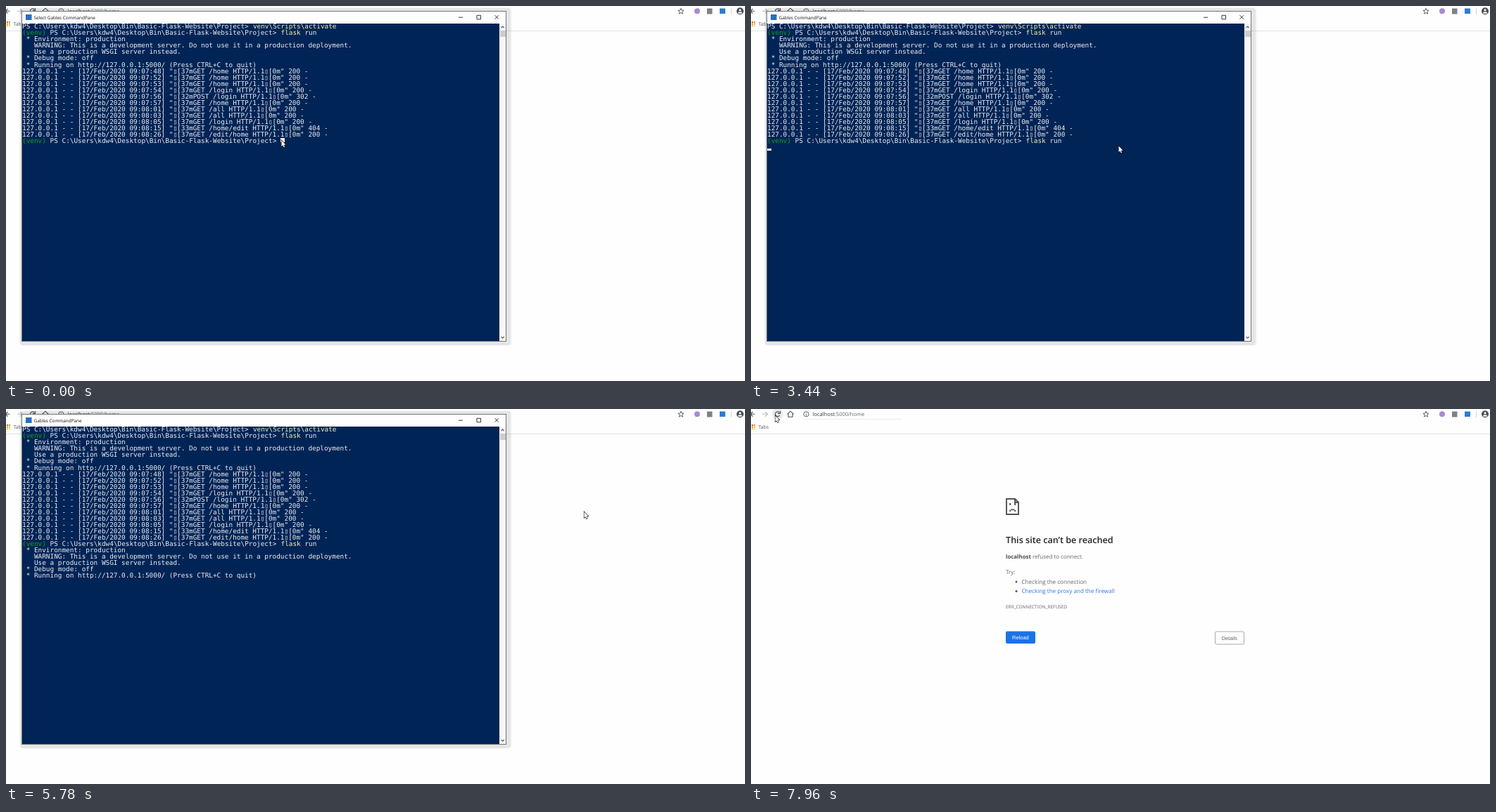
An HTML page with a canvas that plays this animation: 1050 px wide and 534 px high, repeating every 8 s.

```html
<!DOCTYPE html>
<html lang="en">
<head>
<meta charset="utf-8">
<title>Restarting a server</title>
<style>
html, body { margin: 0; width: 100%; height: 100%; overflow: hidden; background: #fefefe; }
canvas { display: block; }
</style>
</head>
<body>
<canvas id="stage" width="1050" height="534"></canvas>
<script>
const ctx = document.getElementById('stage').getContext('2d');
const SANS = '"Open Sans", "Noto Sans", sans-serif';
const ARIAL = '"Liberation Sans", Arial, sans-serif';
const MONO = '9.39px "DejaVu Sans Mono", monospace';
const CELL = 5.654, ROW = 9.05, LEFT = 23, TOP = 25;
const NAVY = '#012456', PALE = '#eeedf0', CREAM = '#feedd8', GREEN = '#16a01a', YELLOW = '#f3efb0';
const INK = '#4d5155', GRAY = '#646464';

// Key moments of the story, in ms.
const LOOP = 8000, DESELECT = 1490, TYPING = 2360, ENTER = 3440, SERVING = 4830, MINIMIZE = 5930;
const KEY_STEP = 120, MOVE_STEP = 140, BLINK = 510;

const COMMAND = 'flask run';
const VENV = '(venv) ';
const PATH = 'PS C:\\Users\\kdw4\\Desktop\\Bin\\Basic-Flask-Website\\Project> ';
const PROMPT_COL = VENV.length + PATH.length;
const BANNER = [
  ' * Environment: production',
  '   WARNING: This is a development server. Do not use it in a production deployment.',
  '   Use a production WSGI server instead.',
  ' * Debug mode: off',
  ' * Running on http://127.0.0.1:5000/ (Press CTRL+C to quit)'
];
const REQUESTS = [
  '07:48] "▯[37mGET /home 200', '07:52] "▯[37mGET /home 200', '07:53] "▯[37mGET /home 200',
  '07:54] "▯[37mGET /login 200', '07:56] "▯[32mPOST /login 302', '07:57] "▯[37mGET /home 200',
  '08:01] "▯[37mGET /all 200', '08:03] "▯[37mGET /all 200', '08:05] "▯[37mGET /login 200',
  '08:15] "▯[33mGET /home/edit 404', '08:26] "▯[37mGET /edit/home 200'
].map(entry => '127.0.0.1 - - [17/Feb/2020 09:' + entry.replace(/ (\d+)$/, ' HTTP/1.1▯[0m" $1 -'));
const PROMPT_ROW = 2 + BANNER.length + REQUESTS.length;

// Pointer moves: each reaches its goal in equal steps.
const MOVES = [
  { at: 750, steps: 2, x: 522, y: 199 },
  { at: SERVING, steps: 1, x: 713, y: 177, shape: 'resize' },
  { at: 4990, steps: 1, x: 832, y: 177 },
  { at: 5260, steps: 1, x: 819, y: 177 },
  { at: 5780, steps: 1, x: 821, y: 146 },
  { at: 6190, steps: 3, x: 497, y: 259, shape: 'hand' },
  { at: 6640, steps: 3, x: 287, y: 114 },
  { at: 7150, steps: 2, x: 21, y: 14 },
  { at: 7530, steps: 2, x: 34, y: 9 }
];

function pointerAt(t) {
  let pose = { x: 391, y: 191 };
  for (const move of MOVES.filter(m => m.at <= t)) {
    const p = Math.min(1, (Math.floor((t - move.at) / MOVE_STEP) + 1) / move.steps);
    pose = {
      x: pose.x + (move.x - pose.x) * p,
      y: pose.y + (move.y - pose.y) * p,
      shape: p === 1 ? move.shape : undefined
    };
  }
  return pose;
}

function typedCount(t) {
  const step = Math.floor((t - TYPING) / KEY_STEP);
  return Math.max(0, Math.min(COMMAND.length, Math.round(step * COMMAND.length / 7)));
}

function caretOn(t) {
  const typed = typedCount(t);
  if (typed && typed < COMMAND.length) return true;
  const restart = [-260, 1860, ENTER, SERVING + 140].findLast(s => s <= t);
  return Math.floor((t - restart) / BLINK) % 2 === 0;
}

function text(str, x, y, font, color) {
  ctx.font = font;
  ctx.fillStyle = color;
  ctx.fillText(str, x, y);
}

function rect(x, y, w, h, color) {
  ctx.fillStyle = color;
  ctx.fillRect(x, y, w, h);
}

function stroke(shape, color = INK, width = 1.1) {
  ctx.strokeStyle = color;
  ctx.lineWidth = width;
  ctx.stroke(new Path2D(shape));
}

function disc(x, y, r, color) {
  ctx.beginPath();
  ctx.arc(x, y, r, 0, 2 * Math.PI);
  ctx.fillStyle = color;
  ctx.fill();
}

function panel(x, y, w, h, r, fill, border) {
  ctx.beginPath();
  ctx.roundRect(x, y, w, h, r);
  ctx.fillStyle = fill;
  ctx.fill();
  if (!border) return;
  ctx.strokeStyle = border;
  ctx.lineWidth = 1;
  ctx.stroke();
}

function arrow(tip, tail, y, color) {
  const side = Math.sign(tail - tip) * 3.3;
  stroke(`M${tail} ${y}H${tip}m${side} -3.3l${-side} 3.3l${side} 3.3`, color);
}

function chevron(x, y, rise) {
  stroke(`M${x - 2} ${y + rise}l2 ${-rise}l2 ${rise}`, '#555');
}

function drawToolbar(t) {
  if (t >= 7960) disc(38, 7, 8, '#e9eaec');
  arrow(-0.8, 5.5, 7.3, INK);
  arrow(23.5, 16, 7.3, '#b4b7ba');
  stroke('M40.8 9A3.4 3.4 0 1 1 40.2 4.8M41.5 3V6.4H38', INK, 1.3);
  stroke('M51.5 7.5L56 3.2L60.5 7.5M53 7V11.3H59V7');
  stroke('M74.8 7.3a3.6 3.6 0 1 0 7.2 0a3.6 3.6 0 1 0 -7.2 0M78.4 5.2v1M78.4 6.9v2.5', INK, 0.9);

  const urlFont = '7.5px ' + SANS;
  text('localhost', 87.5, 10, urlFont, '#34373a');
  text(':5000/home', 87.5 + ctx.measureText('localhost').width, 10, urlFont, '#666a6e');
  if (t >= 7150) rect(75, 14, 140, 1, '#ececee');

  for (let i = 0; i < 9; i++) {
    const row = Math.floor(i / 3);
    rect(-2 + i % 3 * 3, 22 + row * 2.7, 2, 2, `hsl(${row * 18 + i % 3 * 12} 80% 55%)`);
  }
  text('Tabs', 10.5, 28, '6.8px ' + SANS, '#54585c');

  ctx.beginPath();
  for (let i = 0; i < 10; i++) {
    const r = i % 2 ? 1.9 : 4.3, a = i * Math.PI / 5 - Math.PI / 2;
    ctx.lineTo(959 + r * Math.cos(a), 7.6 + r * Math.sin(a));
  }
  ctx.closePath();
  ctx.strokeStyle = INK;
  ctx.lineWidth = 0.9;
  ctx.stroke();

  disc(982, 7.3, 4, '#a78bd0');
  rect(996, 3.5, 7.5, 8, '#808080');
  rect(1014, 3.5, 8, 7.5, '#2b7cd3');
  rect(1030, 3, 1, 9, '#d5d7da');
  disc(1043, 7.3, 5, '#494c50');
  disc(1043, 5.8, 1.6, '#fff');
  panel(1040.2, 8.6, 5.6, 2.2, 1.1, '#fff');
  rect(0, 35, 1050, 1, '#e2e3e5');
}

function drawErrorPage() {
  const list = '8.1px ' + SANS, icon = '#535353';
  stroke('M376 128H363V150H380V132M375 127V133H381M375 128L380 133', icon, 1.9);
  for (const side of [-1, 1]) {
    rect(370.7 + side * 3.5, 134, 2, 3, icon);
    rect(370.7 + side * 3.5, 144, 2, 2, icon);
  }
  rect(369, 142.5, 5.5, 1.7, icon);

  text('This site can’t be reached', 362, 191, '600 12.6px ' + SANS, '#202124');
  text('localhost', 362, 213, '700 7.9px ' + SANS, '#4c4c4c');
  text('refused to connect.', 400, 213, '8px ' + SANS, GRAY);
  text('Try:', 362, 235, '8px ' + SANS, GRAY);
  disc(377, 246, 1.5, '#555');
  disc(377, 259.5, 1.5, '#555');
  text('Checking the connection', 384.5, 248.5, list, GRAY);
  text('Checking the proxy and the firewall', 384.5, 262, list, '#2b76e0');
  text('ERR_CONNECTION_REFUSED', 362, 283.5, '6.5px ' + SANS, GRAY);

  panel(362, 316.5, 42, 17.5, 2, '#1a73e8');
  text('Reload', 371, 328, '7.5px ' + ARIAL, '#fff');
  panel(659.5, 317, 41, 18, 2, '#fff', '#a8a8a8');
  text('Details', 668.7, 328.5, '7.3px ' + ARIAL, GRAY);
}

const cellX = col => LEFT + col * CELL;

function put(str, col, row, color = PALE) {
  text(str, cellX(col), Math.round(TOP + row * ROW + 7.2), MONO, color);
}

function putLines(lines, row) {
  lines.forEach((str, i) => put(str, 0, row + i));
}

function putPrompt(row, command) {
  put(VENV, 0, row, GREEN);
  put(PATH, VENV.length, row);
  put(command.slice(0, 5), PROMPT_COL, row, YELLOW);
  put(command.slice(5), PROMPT_COL + 5, row);
}

function drawConsole(t) {
  const typed = typedCount(t), selecting = t < DESELECT;
  put(PATH, 0, 0);
  put('venv\\Scripts\\activate', PATH.length, 0, YELLOW);
  putPrompt(1, COMMAND);
  putLines(BANNER, 2);
  putLines(REQUESTS, 2 + BANNER.length);
  putPrompt(PROMPT_ROW, COMMAND.slice(0, typed));
  if (t >= SERVING) putLines(BANNER, PROMPT_ROW + 1);

  if (selecting) rect(390, 188, 6, 9, CREAM);
  if (!caretOn(t)) return;
  const col = t < ENTER ? PROMPT_COL + typed : 0;
  const row = PROMPT_ROW + (t >= ENTER) + (t >= SERVING) * BANNER.length;
  rect(Math.floor(cellX(col)), Math.round(TOP + (row + 1) * ROW) - 3, 6, 3, selecting ? NAVY : CREAM);
}

function drawWindow(t) {
  panel(19, 2, 700, 482, 5, 'rgba(0,0,0,.03)');
  panel(20, 3, 697, 480, 4, 'rgba(0,0,0,.07)');
  rect(22, 7, 689, 471, '#70767f');
  rect(23, 8, 687, 17, '#fff');
  rect(23, 25, 678, 452, NAVY);
  rect(28, 12, 8.5, 8, '#2671be');
  text((t < DESELECT ? 'Select ' : '') + 'Gables CommandPane', 39.5, 18.7, '6.4px ' + SANS, '#111');
  stroke('M643 16.2h6M669 13.3h5.5v5.5h-5.5zM694.5 13.2l5.5 5.5m0 -5.5l-5.5 5.5', '#222', 0.9);

  rect(701, 25, 9, 452, '#f7f7f7');
  rect(702, 35, 8, 9, '#cdcdcd');
  chevron(705.7, 29, 2);
  chevron(705.7, 473, -2);
  drawConsole(t);
}

function drawPointer({ x, y, shape }) {
  ctx.save();
  ctx.translate(x, y);
  if (shape === 'resize') {
    stroke('M-6 0H6M-3.5 -2.6L-6 0L-3.5 2.6M3.5 -2.6L6 0L3.5 2.6', '#222', 1.1);
  } else if (shape === 'hand') {
    panel(1, 4, 8, 7, 2, '#fff', '#111');
    panel(3, 0.5, 2, 7, 1, '#fff', '#111');
  } else {
    const outline = 'M.5 .5V9L2.4 7.3L3.7 10.3L5 9.7L3.7 6.8L6.3 6.5Z';
    stroke(outline, '#111', 1.2);
    ctx.fillStyle = '#fff';
    ctx.fill(new Path2D(outline));
  }
  ctx.restore();
}

function draw(t) {
  rect(0, 0, 1050, 534, '#fefefe');
  drawToolbar(t);
  if (t < MINIMIZE) drawWindow(t);
  else drawErrorPage();
  drawPointer(pointerAt(t));
}

ctx.textRendering = 'geometricPrecision';
const start = performance.now();
function tick() {
  draw((performance.now() - start) % LOOP);
  requestAnimationFrame(tick);
}
tick();
</script>
</body>
</html>
```
